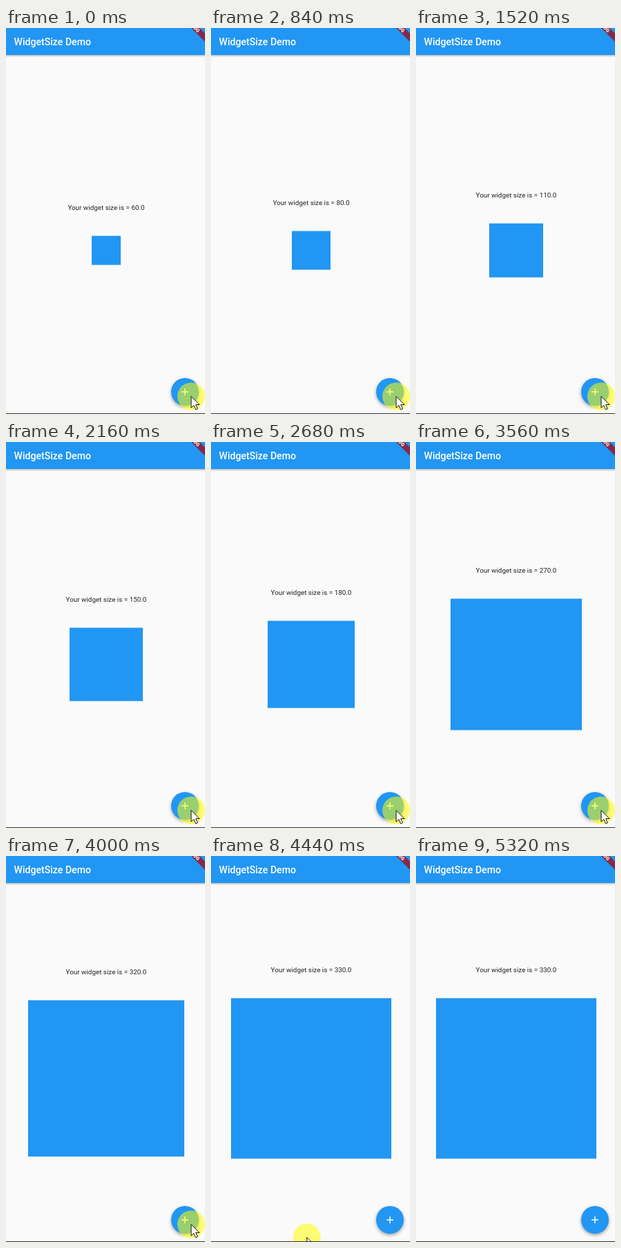
Animation of 288x558 px, one loop 5.36 s. Source, as an HTML page:

```html
<!DOCTYPE html>
<html lang="en">
<head>
<meta charset="utf-8">
<title>WidgetSize Demo</title>
<style>
  html, body { margin: 0; width: 100%; height: 100%; overflow: hidden; background: #fafafa; }
  svg { display: block; width: 288px; height: 558px; font-family: Roboto, sans-serif; }
  .blue { fill: #2196f3; }
  .bar { filter: drop-shadow(0 1.5px 1.5px rgba(0, 0, 0, .34)); }
  .fab { filter: drop-shadow(0 2.5px 2.5px rgba(0, 0, 0, .36)); }
</style>
</head>
<body>
<svg viewBox="0 0 288 558">
  <rect width="288" height="558" fill="#fafafa"/>
  <rect class="blue bar" x="-6" y="-6" width="300" height="45"/>
  <text x="11.5" y="24.5" font-size="14.1" font-weight="500" fill="#fff">WidgetSize Demo</text>

  <g transform="translate(288 -20) rotate(45)">
    <rect x="-28.2" y="19.7" width="56.4" height="8.5" fill="#852a4a"/>
    <text y="26.5" font-size="7.2" font-weight="900" fill="#fff" text-anchor="middle">DEBUG</text>
  </g>

  <text id="label" x="145" font-size="9.87" fill="#212121" text-anchor="middle"></text>
  <rect id="box" class="blue"/>

  <circle class="blue fab" cx="259" cy="526" r="20"/>
  <path d="M254 526h10M259 521v10" stroke="#fff" stroke-width="1.5"/>

  <g id="pointer">
    <circle r="20" fill="#ffff00" opacity=".54"/>
    <path d="M0 0V16.5L3.9 13L6.6 19.2L9.4 18L6.7 12H12Z" fill="#fff" stroke="#111" stroke-width="1"/>
  </g>
  <rect y="557" width="288" height="1" fill="#333"/>
</svg>
<script>
  const LOOP = 5360, SCALE = 0.704, STEP = 10, MID = { x: 145, y: 321.5 };
  const $ = id => document.getElementById(id);
  const label = $('label'), box = $('box'), pointer = $('pointer');

  // Key points: time, then values
  const growth = [[200, 60], [1460, 110], [2100, 150], [3060, 200], [3460, 260], [4060, 330]];
  const route = [[4120, 268, 532.5], [4440, 139, 551], [4560, 112, 582]];

  // Linear blend between key points, held at both ends
  function at(keys, t) {
    const i = keys.findIndex(k => k[0] > t);
    if (i === 0) return keys[0].slice(1);
    if (i < 0) return keys[keys.length - 1].slice(1);
    const [t0, ...a] = keys[i - 1], [t1, ...b] = keys[i];
    return a.map((v, j) => v + (b[j] - v) * (t - t0) / (t1 - t0));
  }

  function draw(t) {
    const size = Math.floor(at(growth, t)[0] / STEP + 1e-6) * STEP;
    const half = Math.round(size * SCALE / 2);
    const top = MID.y - half;
    box.setAttribute('x', MID.x - half);
    box.setAttribute('y', top);
    box.setAttribute('width', half * 2);
    box.setAttribute('height', half * 2);
    label.setAttribute('y', top - 37.5);
    label.textContent = `Your widget size is = ${size.toFixed(1)}`;
    pointer.setAttribute('transform', `translate(${at(route, t)})`);
  }

  const start = performance.now();
  function tick() {
    draw((performance.now() - start) % LOOP);
    requestAnimationFrame(tick);
  }
  tick();
</script>
</body>
</html>
```
